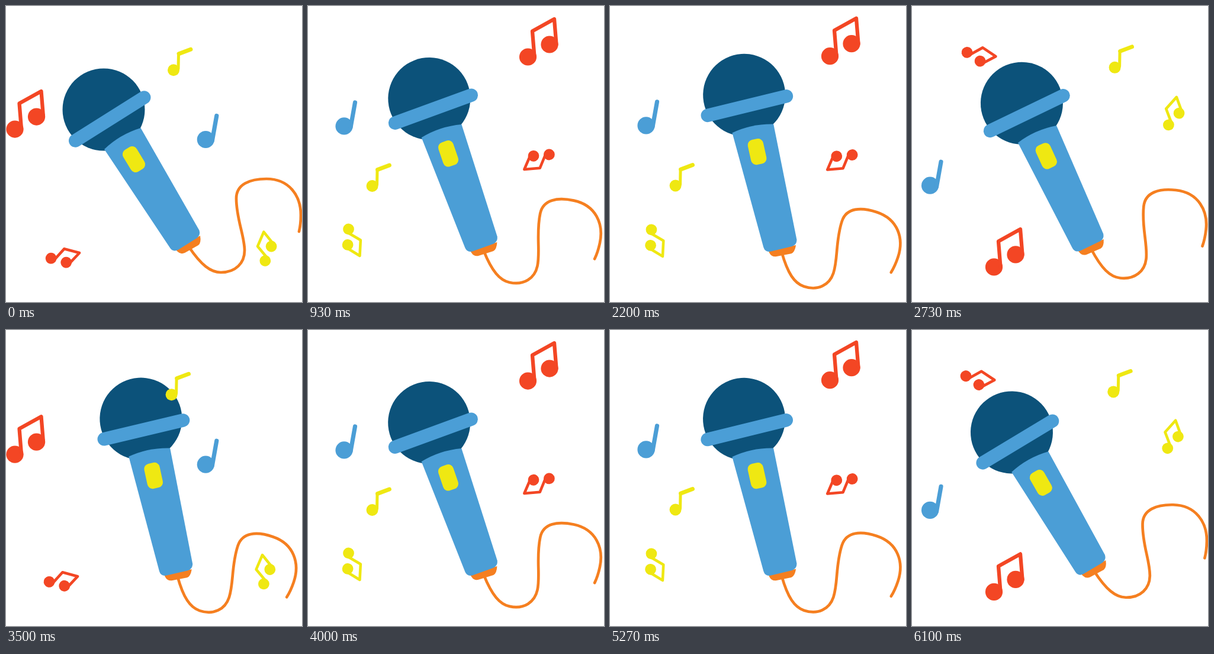
An HTML page that plays this animation: 500x500 px, repeating every 6.13 s.

```html
<!DOCTYPE html>
<html lang="en">
<head>
<meta charset="utf-8">
<title>Microphone</title>
<style>
html, body { margin: 0; width: 100%; height: 100%; overflow: hidden; background: #fff; }
svg { display: block; width: 100vw; height: 100vh; }
.line { fill: none; stroke-linecap: round; stroke-linejoin: round; }
</style>
</head>
<body>
<svg viewBox="0 0 500 500">
  <g id="mic">
    <path class="line" stroke="#f57f20" stroke-width="4.7" d="M309 407C330 438 346 450 363 450C388 450 403 434 403 413C403 388 389 360 389 325C389 301 412 292 440 292C478 292 498 320 498 353C498 365 497 373 495 381"/>
    <path fill="#f57f20" d="M286 411L290 415Q295 420 302 417L325 404Q330 400 328 388Z"/>
    <circle cx="165" cy="175" r="69.5" fill="#0c527a"/>
    <path fill="#4b9ed6" d="M166 242Q192 217 227.500 206L326.500 379Q329 387 322.500 392L290.500 412Q282 416 277 408.500Z"/>
    <path class="line" stroke="#4b9ed6" stroke-width="22.5" d="M117.200 227.400L233.200 154.400"/>
    <rect x="-13.300" y="-21.500" width="26.600" height="43" rx="9" fill="#efe812" transform="translate(216 259) rotate(-31)"/>
  </g>
  <g id="notes"></g>
</svg>
<script>
const LOOP = 6130, BEAT = LOOP / 4;
const RED = '#f34624', BLUE = '#4b9ed6', YELLOW = '#efe812';

const head = (x, y, r, color) => `<circle cx="${x}" cy="${y}" r="${r}" fill="${color}"/>`;
const line = (d, width, color) => `<path class="line" d="${d}" stroke="${color}" stroke-width="${width}"/>`;
const smallPair = color => head(0, 0, 9.4, color) + head(26.5, 0, 9.4, color) +
  line('M6 1L17.500 -21.300H44L32 1', 4.6, color);

// A note visits three spots per beat and drifts a little around each.
const notes = [
  { art: head(0, 0, 14.6, RED) + head(36.5, -21, 14.6, RED) +
      line('M11 0L7.500 -43.500L44.500 -64L48 -21', 6.3, RED),
    spots: [[15, 209.3], [371.5, 85.2], [138.5, 441.3]], drift: [0, 2.5] },
  { art: head(0, 0, 14.6, BLUE) + line('M11 2L18.500 -40', 7.2, BLUE),
    spots: [[337.3, 226.5], [61, 202.3], [30.5, 303.5]], drift: [0, 2] },
  { art: head(0, 0, 10, YELLOW) + line('M8 -2L8.500 -27', 5, YELLOW) +
      line('M9 -27.500L29 -35', 6.8, YELLOW),
    spots: [[281, 108.8], [109.8, 303.7], [342, 104]], drift: [-4, 1] },
  { art: smallPair(RED), turn: 15,
    spots: [[74.3, 425.7], [408.5, 251.3], [92.5, 78.2]], drift: [-3.5, -1] },
  { art: smallPair(YELLOW), turn: -67,
    spots: [[436.4, 429.5], [69.4, 377.5], [433, 200.6]], drift: [-2.8, -1.8] }
];
const spotTurn = [0, 160, 18.8];

const mic = document.getElementById('mic');
const layer = document.getElementById('notes');
layer.innerHTML = notes.map(n => `<g>${n.art}</g>`).join('');

// Up in a third of a beat, back down in the rest.
const PEAK = 22.3, REST = .8;
const swing = p => p < 1 / 3
  ? PEAK * (p * 3) ** 1.08
  : REST + (PEAK - REST) * ((1 - p) * 1.5) ** 1.2;

// Ten steps per 700 ms, the last of them held a little longer.
function stepTime(t) {
  if (t < 100) return 0;
  const step = 200 / 3, rest = (t - 100) % 700;
  return t - rest + step * Math.min(9, Math.floor((rest + 3.4) / step));
}

function draw(time) {
  const phase = stepTime(time % LOOP) / BEAT % 1;
  const spot = Math.floor(phase * 3), k = phase * 3 - spot - .5;
  mic.setAttribute('transform', `rotate(${swing(phase)} 272 353)`);
  notes.forEach(({ spots, drift, turn }, i) => {
    const [x, y] = spots[spot];
    const angle = turn === undefined ? 0 : turn + spotTurn[spot];
    layer.children[i].setAttribute('transform',
      `translate(${x + drift[0] * k} ${y + drift[1] * k}) rotate(${angle})`);
  });
}

const start = performance.now();
function tick() {
  draw(performance.now() - start);
  requestAnimationFrame(tick);
}
tick();
</script>
</body>
</html>
```
